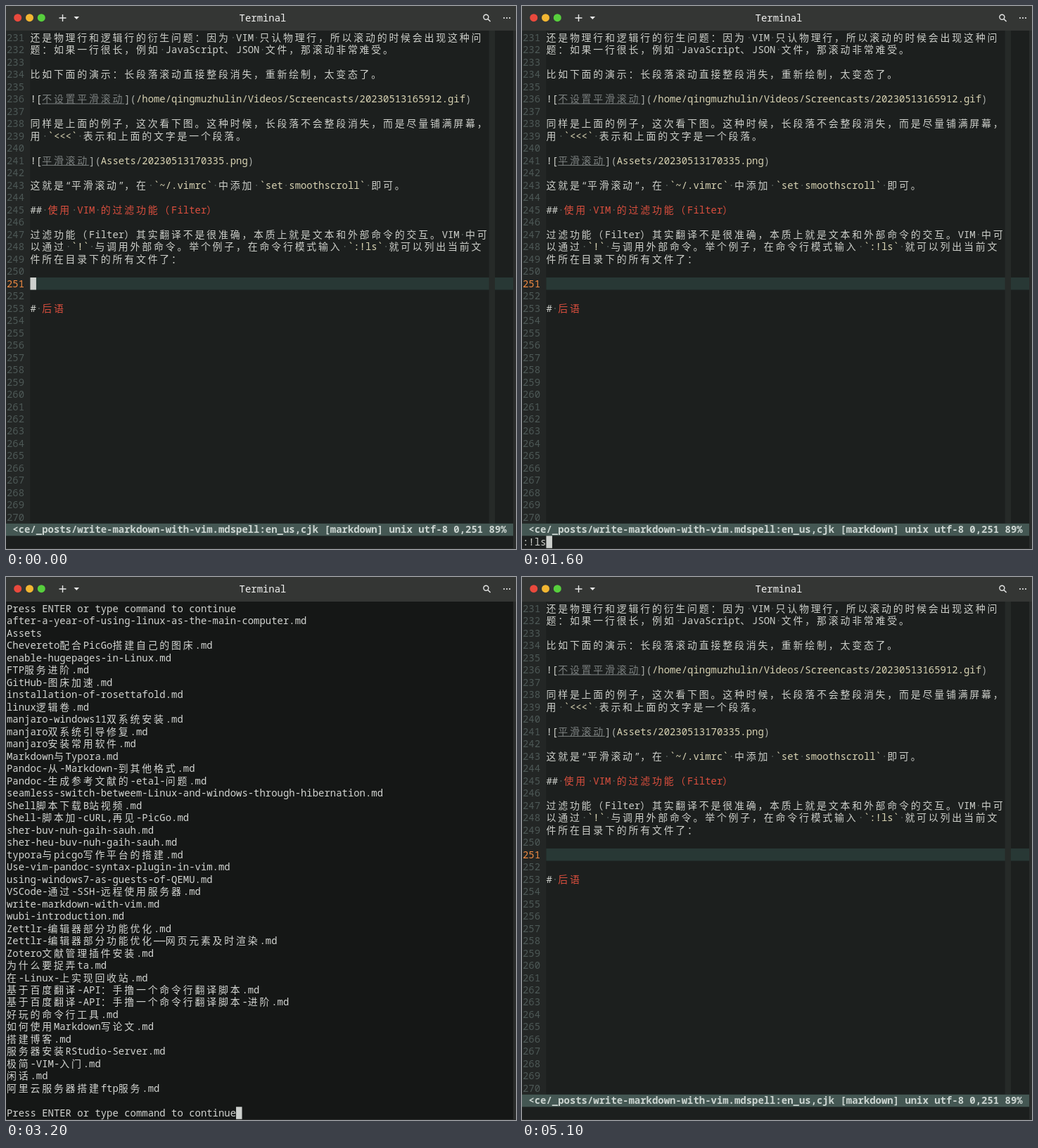
These frames come from a looping animation (725 px wide and 772 px high, 5700 ms). An HTML page:

```html
<!DOCTYPE html>
<html lang="zh-CN">
<head>
<meta charset="utf-8">
<title>Terminal</title>
<style>
  html, body { margin: 0; width: 100%; height: 100%; overflow: hidden; background: #1c1f1e; }
  svg { display: block; }
  text {
    font: 13.93px "Noto Sans Mono", "Noto Sans CJK SC", "Noto Sans CJK", monospace;
    fill: #cdcfca; white-space: pre; font-variant-ligatures: none;
  }
  .path { fill: #d8d3b3; }
  .link { fill: #7c8180; }
  .head { fill: #db4f3e; }
  .mark { fill: #a9ada9; }
  .dot { fill: #56605d; }
  .num { fill: #4d5856; }
  .now { fill: #ee8a42; }
  .out { fill: #d3d5d2; }
  .bar { fill: #ccd5d1; font-weight: bold; }
  .title { fill: #f2f2f1; font-weight: 500; }
</style>
</head>
<body>
<svg id="stage" width="725" height="772" viewBox="0 0 725 772"></svg>
<script>
const LOOP = 5700, CELL = 8.36, ROW = 17.49, LEFT = 1, TOP = 36.2;
const FIRST_LINE = 231, CURRENT = 251, GUTTER = 4, COMMAND_ROW = 41;
const PROMPT = 'Press ENTER or type command to continue';

// {style|text} marks a highlighted run.
const article = {
  231: '还是物理行和逻辑行的衍生问题：因为 VIM 只认物理行，所以滚动的时候会出现这种问',
  232: '题：如果一行很长，例如 JavaScript、JSON 文件，那滚动非常难受。',
  234: '比如下面的演示：长段落滚动直接整段消失，重新绘制，太变态了。',
  236: '![{link|不设置平滑滚动}{mark|](}{path|/home/qingmuzhulin/Videos/Screencasts/20230513165912.gif}{mark|)}',
  238: '同样是上面的例子，这次看下图。这种时候，长段落不会整段消失，而是尽量铺满屏幕，',
  239: '用 {path|`<<<`} 表示和上面的文字是一个段落。',
  241: '![{link|平滑滚动}{mark|](}{path|Assets/20230513170335.png}{mark|)}',
  243: '这就是“平滑滚动”，在 {path|`~/.vimrc`} 中添加 {path|`set smoothscroll`} 即可。',
  245: '## {head|使用 VIM 的过滤功能（Filter）}',
  247: '过滤功能（Filter）其实翻译不是很准确，本质上就是文本和外部命令的交互。VIM 中可',
  248: '以通过 {path|`!`} 与调用外部命令。举个例子，在命令行模式输入 {path|`:!ls`} 就可以列出当前文',
  249: '件所在目录下的所有文件了：',
  253: '# {head|后语}'
};

const listing = `after-a-year-of-using-linux-as-the-main-computer.md
Assets
Chevereto配合PicGo搭建自己的图床.md
enable-hugepages-in-Linux.md
FTP服务进阶.md
GitHub-图床加速.md
installation-of-rosettafold.md
linux逻辑卷.md
manjaro-windows11双系统安装.md
manjaro双系统引导修复.md
manjaro安装常用软件.md
Markdown与Typora.md
Pandoc-从-Markdown-到其他格式.md
Pandoc-生成参考文献的-etal-问题.md
seamless-switch-betweem-Linux-and-windows-through-hibernation.md
Shell脚本下载B站视频.md
Shell-脚本加-cURL,再见-PicGo.md
sher-buv-nuh-gaih-sauh.md
sher-heu-buv-nuh-gaih-sauh.md
typora与picgo写作平台的搭建.md
Use-vim-pandoc-syntax-plugin-in-vim.md
using-windows7-as-guests-of-QEMU.md
VSCode-通过-SSH-远程使用服务器.md
write-markdown-with-vim.md
wubi-introduction.md
Zettlr-编辑器部分功能优化.md
Zettlr-编辑器部分功能优化——网页元素及时渲染.md
Zotero文献管理插件安装.md
为什么要捉弄ta.md
在-Linux-上实现回收站.md
基于百度翻译-API：手撸一个命令行翻译脚本.md
基于百度翻译-API：手撸一个命令行翻译脚本-进阶.md
好玩的命令行工具.md
如何使用Markdown写论文.md
搭建博客.md
服务器安装RStudio-Server.md
极简-VIM-入门.md
闲话.md
阿里云服务器搭建ftp服务.md`.split('\n');

const stage = document.getElementById('stage');

function add(parent, tag, attrs = {}, content = '') {
  const node = document.createElementNS('http://www.w3.org/2000/svg', tag);
  for (const key in attrs) node.setAttribute(key, attrs[key]);
  node.textContent = content;
  parent.appendChild(node);
  return node;
}
const rect = (parent, x, y, width, height, fill) => add(parent, 'rect', { x, y, width, height, fill });
const colX = col => LEFT + col * CELL;
const rowY = row => TOP + row * ROW;
const cells = ch => /[\u3000-\u9fff\uff00-\uffef]/.test(ch) ? 2 : 1;

// Writes text on the terminal grid and returns the next free column.
function write(parent, row, col, text, style = '') {
  const xs = [];
  for (const ch of text) {
    xs.push(colX(col).toFixed(2));
    col += cells(ch);
  }
  add(parent, 'text', { x: xs.join(' '), y: (rowY(row) + 13.6).toFixed(2), class: style }, text);
  return col;
}

function writeArticleLine(parent, row, line) {
  let col = GUTTER;
  for (const [, style, marked, plain] of line.matchAll(/\{(\w+)\|(.*?)\}|([^{]+)/g)) {
    const start = col;
    for (const part of (marked || plain).split(/( )/).filter(Boolean)) {
      col = part === ' ' ? write(parent, row, col, '·', 'dot') : write(parent, row, col, part, style);
    }
    if (style === 'link') rect(parent, colX(start), rowY(row) + 14.8, (col - start) * CELL, 1, '#7c8180');
  }
}

function buildEditor() {
  const g = add(stage, 'g');
  const bottom = rowY(40);
  rect(g, 0, 35, 721, 736, '#1c1f1e');
  rect(g, 0, 35, 34.4, bottom - 35, '#232625');
  rect(g, 34.4, rowY(20), 686.6, ROW, '#283835');
  rect(g, 686.6, 35, 8.4, bottom - 35, '#262a28');
  for (let row = 0; row < 40; row++) {
    const number = FIRST_LINE + row;
    write(g, row, 0, String(number), number === CURRENT ? 'now' : 'num');
    if (article[number]) writeArticleLine(g, row, article[number]);
  }
  rect(g, 0, bottom, 721, ROW, '#445753');
  write(g, 40, 1, '<ce/_posts/write-markdown-with-vim.mdspell:en_us,cjk [markdown] unix utf-8 0,251 89%', 'bar');
  return g;
}

function buildOutput() {
  const g = add(stage, 'g');
  rect(g, 0, 35, 721, 736, '#151716');
  [PROMPT, ...listing].forEach((line, row) => write(g, row, 0, line, 'out'));
  write(g, COMMAND_ROW, 0, PROMPT, 'out');
  return g;
}

function buildHeader() {
  rect(stage, 0, 0, 725, 35, '#343634');
  ['#e9493d', '#f2b632', '#57cf3d'].forEach((fill, i) =>
    add(stage, 'circle', { cx: 16.7 + i * 16.8, cy: 16.7, r: 5.5, fill }));
  const line = { fill: 'none', stroke: '#e8e9e8', 'stroke-width': 1.4 };
  add(stage, 'path', { ...line, d: 'M75.5 17h10M80.5 12v10' });
  add(stage, 'path', { d: 'M96.5 15h7.6l-3.8 4z', fill: '#e8e9e8' });
  add(stage, 'text', { x: 365, y: 21.5, 'text-anchor': 'middle', class: 'title' }, 'Terminal');
  add(stage, 'circle', { ...line, cx: 682.4, cy: 15.8, r: 3.5 });
  add(stage, 'path', { ...line, d: 'M685 18.4l3.6 3.6' });
  for (const cx of [708, 712, 716]) add(stage, 'circle', { cx, cy: 17, r: 1.1, fill: '#e8e9e8' });
}

rect(stage, 0, 0, 725, 772, '#2a2c2b');
const editor = buildEditor();
const output = buildOutput();
buildHeader();
const command = add(stage, 'text', { x: LEFT, y: rowY(COMMAND_ROW) + 13.6 });
const cursor = rect(stage, 0, 0, 8.5, ROW, '#cdd0cd');

const within = (t, from, to) => t >= from && t < to;

function typedAt(t) {
  if (!within(t, 300, 2100)) return '';
  return ':!ls'.slice(0, t < 1000 ? 1 : t < 1500 ? 2 : t < 1600 ? 3 : 4);
}

function render(t) {
  const listed = within(t, 2100, 3300);
  const typed = typedAt(t);
  const hidden = within(t, 2600, 3200) || within(t, 3900, 4500) || t >= 5100;
  const col = listed ? PROMPT.length : typed.length || GUTTER;
  const row = listed || typed ? COMMAND_ROW : CURRENT - FIRST_LINE;
  editor.style.display = listed ? 'none' : '';
  output.style.display = listed ? '' : 'none';
  command.textContent = typed;
  cursor.setAttribute('x', colX(col));
  cursor.setAttribute('y', rowY(row));
  cursor.style.display = hidden ? 'none' : '';
}

const start = performance.now();
function tick() {
  render((performance.now() - start) % LOOP);
  requestAnimationFrame(tick);
}
tick();
</script>
</body>
</html>
```
